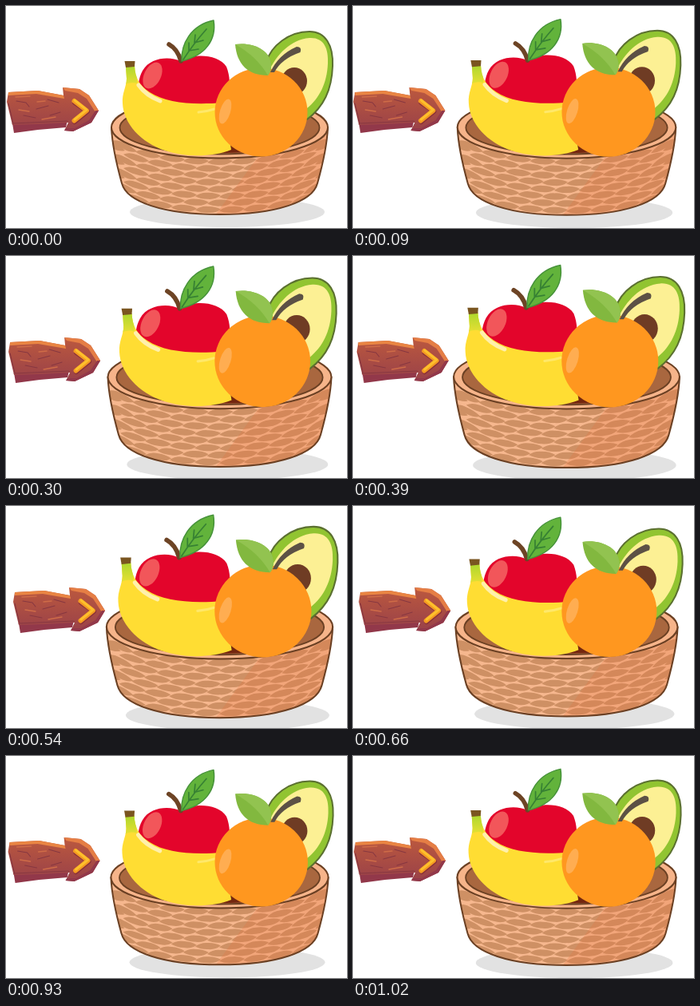
These frames come from a looping animation (427 by 278 pixels, 1.05 s). An HTML page with a canvas:

```html
<!DOCTYPE html>
<html lang="en">
<head>
<meta charset="utf-8">
<title>Fruit basket</title>
<style>
html, body { margin: 0; width: 100%; height: 100%; overflow: hidden; background: #fff; }
canvas { display: block; width: 427px; height: 278px; }
</style>
</head>
<body>
<canvas id="stage" width="427" height="278"></canvas>
<script>
const ctx = document.getElementById('stage').getContext('2d');
const LOOP = 1050, STEP = 30, CX = 267.5, CY = 168;

// [time, basket width] and [time, arrow shift]
const WIDTHS = [[0, 271], [180, 276], [390, 282.8], [465, 284.6], [540, 283.2], [660, 278], [810, 272.2], [870, 270.8], [1020, 274]];
const SHIFTS = [[0, 0], [90, -0.6], [180, 0], [390, 3.7], [540, 8], [660, 6.2], [810, 3.7], [1020, 0]];

function valueAt(keys, t) {
  for (let i = 1; i < keys.length; i++) {
    const [t0, a] = keys[i - 1], [t1, b] = keys[i];
    if (t <= t1) return a + (b - a) * (t - t0) / (t1 - t0);
  }
  return keys[keys.length - 1][1];
}

function shape(d, fill, stroke, width = 1) {
  const p = new Path2D(d);
  if (fill) { ctx.fillStyle = fill; ctx.fill(p); }
  if (stroke) { ctx.strokeStyle = stroke; ctx.lineWidth = width; ctx.stroke(p); }
}

function oval(x, y, rx, ry, fill, turn = 0, stroke, width = 1) {
  ctx.beginPath();
  ctx.ellipse(x, y, rx, ry, turn, 0, Math.PI * 2);
  if (fill) { ctx.fillStyle = fill; ctx.fill(); }
  if (stroke) { ctx.strokeStyle = stroke; ctx.lineWidth = width; ctx.stroke(); }
}

function within(d, draw) {
  ctx.save();
  ctx.clip(new Path2D(d));
  draw();
  ctx.restore();
}

function fade(y0, y1, top, bottom) {
  const g = ctx.createLinearGradient(0, y0, 0, y1);
  g.addColorStop(0, top);
  g.addColorStop(1, bottom);
  return g;
}

const BODY = 'M132 152 C133 178 140 204 145 222 C151 245 196 261 267.5 261 C339 261 384 245 390 222 C395 204 402 178 403 152 Z';
const BROWN = '#6b4023';

function sag(x) {
  const u = Math.min(1, Math.abs(x - CX) / 136);
  return 33 * Math.pow(1 - u * u, 0.6);
}

function weave() {
  for (let row = 0; row < 10; row++) {
    for (let x = 118 + (row % 2) * 15; x < 420; x += 30) {
      const y = 162 + row * 8.6 + sag(x);
      const slope = (sag(x + 8) - sag(x - 8)) / 16;
      ctx.save();
      ctx.translate(x, y);
      ctx.transform(1, Math.max(-0.5, Math.min(0.5, slope)), 0, 1, 0, 0);
      shape('M-16 1 Q-9 -4.5 0 -4 Q9 -4.5 16 -1 Q9 4.5 0 4 Q-9 4.5 -16 1 Z', '#ce9064');
      ctx.restore();
    }
  }
}

function basket() {
  oval(277, 258, 122, 19, '#e2e2e2');
  shape(BODY, '#f6b78e');
  within(BODY, () => {
    weave();
    shape('M322 180 L404 150 V262 H262 Z', 'rgba(228,112,62,.26)');
  });
  shape(BODY, null, BROWN, 2);
  oval(CX, 152, 135.5, 38.5, '#f6b48a', 0, BROWN, 2);
  oval(CX, 152.5, 125, 33, '#a9673f', 0, BROWN, 1.8);
  shape('M205 165 H330 V181 Q267 188 205 179 Z', '#74260f');
}

function avocado() {
  shape('M326 70 C332 50 354 32 380 32 C400 32 410 49 409 75 C408 105 398 126 377 142 L335 110 Z', '#91c431', '#5b7030', 2);
  shape('M329 82 C339 61 356 42 380 40 C398 39 404 53 403 72 C402 97 392 116 377 128 L340 115 Z', '#fcf094');
  oval(361, 94, 16, 17, '#6f3c24');
}

function apple() {
  shape('M218 69 C207 63 181 63 171 81 C160 101 167 129 187 145 H261 C278 124 285 99 276 76 C267 61 237 59 225 67 Q221 70 218 69 Z', '#e3052b');
  oval(183.5, 87, 10.5, 17.5, '#f2565a', 0.45);
  shape('M204 48 Q215 54 219 69', null, '#6d4425', 5.5);
  shape('M220 69 C219 48 231 24 260 18 C264 42 250 62 220 69 Z', '#62b33b', '#46923a', 1.4);
  shape('M222 67 Q235 47 251 29 M229 56 V46 M229 56 L241 54 M236 46 L237 36 M236 46 L247 43', null, '#378133', 1.7);
}

function banana() {
  const d = 'M150 76 L161 75 C162 91 167 99 180 108 C201 122 235 124 272 121 L282 180 C259 189 226 190 199 181 C169 171 147 147 146 122 C145 109 151 101 151 91 Z';
  shape(d, '#ffdd33');
  within(d, () => {
    shape('M146 73 H164 V97 Q156 94 148 99 Z', fade(76, 98, '#afd82e', '#e6df33'));
    shape('M166 99 Q175 112 193 119', null, '#fff0ab', 5);
  });
  shape('M148.5 69 H161.5 L161 76 L150 77 Z', '#7a5520');
  shape('M241 133 Q252 132 261 129', null, '#ffe869', 3);
}

function orange() {
  oval(319.5, 133, 58, 55.5, '#ff971f');
  oval(274.5, 132, 6.5, 16, '#ffad51', 0.3);
  shape('M331 83 Q341 61 364 51 Q371 51 368.5 58 Q345 66 336 83 Z', '#5c5145');
  shape('M287 48 C309 45 332 55 332 75 Q332 82 328 87 C303 87 289 73 287 48 Z', '#82b83f');
  shape('M287 48 C309 45 332 55 332 75 Q332 82 328 87 Q314 63 287 48 Z', '#92c350');
}

function arrow() {
  shape('M8 147 L77 143 L75 152 L40 155 L10 159 Z', '#92384a');
  shape('M1 120 L3 108 L40 106 L72 112 L71 102 L92 104 L104 112 L116 131 L107 146 L84 157 L73 156 L78 146 L40 148 L8 149 Z', fade(106, 152, '#b9573f', '#9c4348'));
  shape('M3 108 L40 106 L72 112 L73 116 L38 110 L3 112 Z', '#e98543');
  shape('M71 102 L92 104 L104 112 L116 131 L112 133 L101 116 L90 109 L74 106 Z', '#e57e45');
  shape('M116 131 L107 146 L84 157 L73 156 L75 153 L86 153 L104 143 L112 131 Z', '#92384a');
  shape('M3 122 L9 147 M8 147 L77 144 M13 119 L25 121 L29 126 M38 129 L53 125 M22 137 L37 140 M55 137 L68 133 M52 117 L66 121', null, '#873741', 1.1);
  shape('M12 114 L30 113 M39 120 L49 119 M16 130 L29 132 M45 142 L62 139', null, '#cf6c48', 1.3);
  shape('M86 121 L102 132 L86 145', null, '#8a3038', 6);
  shape('M85.5 119 L101 131 L85.5 143.5', null, '#f49a22', 6);
  shape('M86 118 L101 130 L86 142', null, '#fdc02c', 3);
}

function draw(t) {
  ctx.setTransform(1, 0, 0, 1, 0, 0);
  ctx.fillStyle = '#fff';
  ctx.fillRect(0, 0, 427, 278);
  ctx.lineCap = ctx.lineJoin = 'round';

  ctx.save();
  ctx.translate(valueAt(SHIFTS, t), 0);
  arrow();
  ctx.restore();

  const k = valueAt(WIDTHS, t) / 271;
  ctx.translate(CX, CY);
  ctx.scale(k, k);
  ctx.translate(-CX, -CY);
  basket();
  avocado();
  apple();
  banana();
  orange();
}

const start = performance.now();
function tick() {
  const t = (performance.now() - start) % LOOP;
  draw(Math.floor(t / STEP) * STEP);
  requestAnimationFrame(tick);
}
tick();
</script>
</body>
</html>
```
